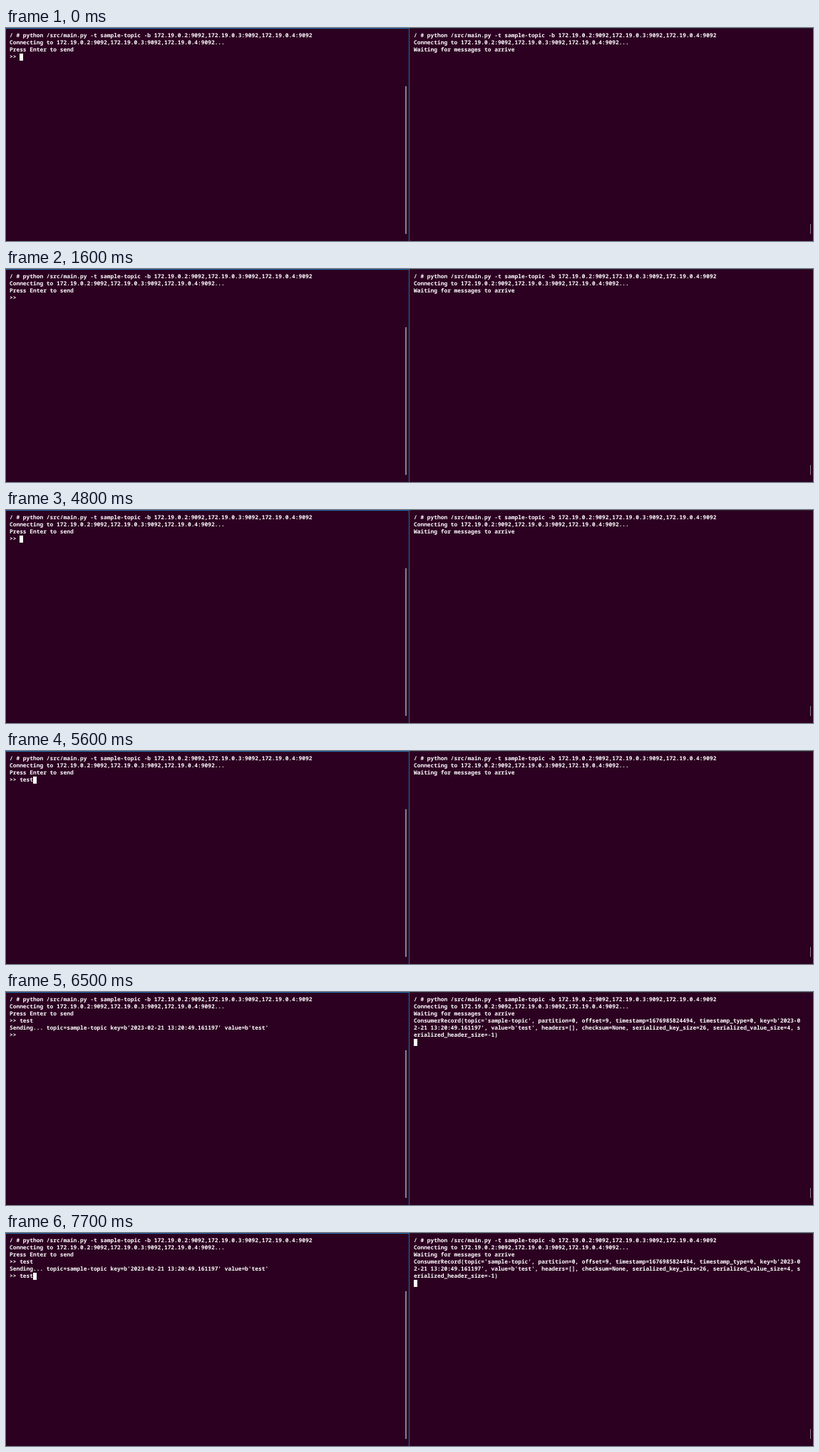
Recreate the animation shown at these times as an HTML page. Size 1132 by 300 pixels, loop 8000 ms.

```html
<!DOCTYPE html>
<html lang="en">
<head>
<meta charset="utf-8">
<title>Producer and consumer terminals</title>
<style>
  html, body { margin: 0; width: 100%; height: 100%; overflow: hidden; background: #2c0021; }
  #stage { position: relative; width: 1132px; height: 300px; overflow: hidden; }
  #stage > * { position: absolute; box-sizing: border-box; margin: 0; }
  pre {
    top: 6px;
    color: #fff;
    font: 600 7.86px/10px "Noto Sans Mono", "DejaVu Sans Mono", monospace;
    font-variant-ligatures: none;
    text-rendering: geometricPrecision;
  }
  #left { left: 5px; }
  #right { left: 572px; }
  .cursor { display: inline-block; width: 1ch; height: 10px; vertical-align: top; background: #fff; }
  .focus { left: 0; top: 0; width: 566px; height: 300px; border: solid #1b6fae; border-width: 1px 1.5px 0 0; }
  .edge { left: 566px; top: 0; width: 566px; height: 1px; background: #2b2029; }
  .bar { width: 2px; background: #8f7d8a; }
</style>
</head>
<body>
<div id="stage">
  <div class="focus"></div>
  <div class="edge"></div>
  <div class="bar" style="left:560px;top:82px;height:208px"></div>
  <div class="bar" style="left:1128px;top:276px;height:14px;width:1px"></div>
  <pre id="left"></pre>
  <pre id="right"></pre>
</div>
<script>
const LOOP = 8000, SENT = 5900;
const WORD = "test";
const CURSOR = '<span class="cursor"></span>';
const brokers = [2, 3, 4].map(n => `172.19.0.${n}:9092`).join(",");
const intro = `/ # python /src/main.py -t sample-topic -b ${brokers}\nConnecting to ${brokers}...\n`;
const stamp = "2023-02-21 13:20:49.161197";
const sending = `Sending... topic=sample-topic key=b'${stamp}' value=b'${WORD}'\n`;
const record = "ConsumerRecord(topic='sample-topic', partition=0, offset=9, timestamp=1676985824494, " +
  `timestamp_type=0, key=b'${stamp}', value=b'${WORD}', headers=[], checksum=None, ` +
  "serialized_key_size=26, serialized_value_size=4, serialized_header_size=-1)";
const COLUMNS = 115;
const wrapped = record.match(new RegExp(`.{1,${COLUMNS}}`, "g")).join("\n") + "\n";

// Key presses for each word, and the times at which the cursor toggles
const firstKeys = [5300, 5400, 5500, 5600];
const secondKeys = [7200, 7300, 7500, 7700];
const blinks = [500, 1000, 1500, 3700, 4200, 4700, 5200, 5300, 6400, 7000];

const passed = (times, t) => times.filter(x => x <= t).length;
const typed = (keys, t) => WORD.slice(0, passed(keys, t));

function setHtml(id, html) {
  const el = document.getElementById(id);
  if (el.shown !== html) el.innerHTML = el.shown = html;
}

function draw(now) {
  const t = now % LOOP, sent = t >= SENT;
  const cursor = passed(blinks, t) % 2 ? "" : CURSOR;
  const prompt = "&gt;&gt; ";
  setHtml("left", intro + "Press Enter to send\n" + prompt + (sent
    ? WORD + "\n" + sending + prompt + typed(secondKeys, t)
    : typed(firstKeys, t)) + cursor);
  setHtml("right", intro + "Waiting for messages to arrive\n" + (sent ? wrapped + CURSOR : ""));
}

const start = performance.now();
function tick() {
  draw(performance.now() - start);
  requestAnimationFrame(tick);
}
tick();
</script>
</body>
</html>
```
